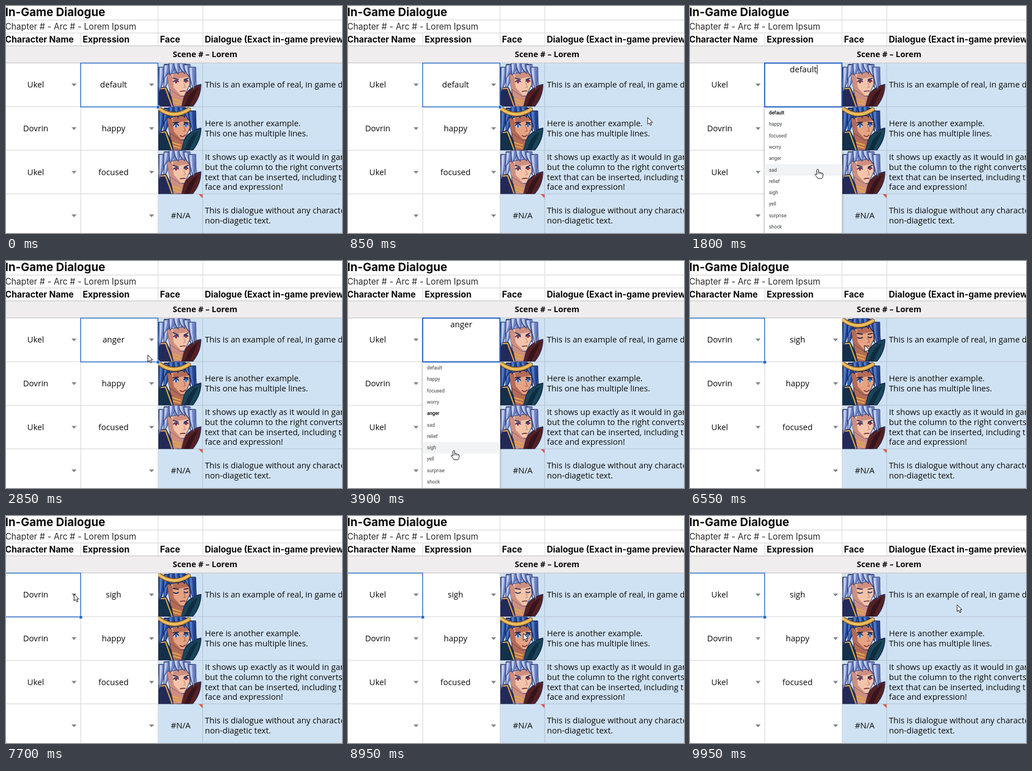
An HTML page for the animation above (10 s loop, 600x404 px).

```html
<!DOCTYPE html>
<html lang="en">
<head>
<meta charset="utf-8">
<title>In-Game Dialogue</title>
<style>
html, body { margin: 0; width: 100%; height: 100%; overflow: hidden; background: #fff; }
svg { display: block; }
text { font: 500 14.6px "Open Sans", "Noto Sans", sans-serif; fill: #0a0a0a; white-space: pre; }
.mid { text-anchor: middle; }
.title { font: 700 20.4px Inter, sans-serif; }
.chapter { font: 15.2px Inter, sans-serif; fill: #2b2b2b; }
.head { font: 700 15.4px Inter, sans-serif; }
.scene { font-weight: 700; font-size: 14.4px; }
.item { font: 8.7px Roboto, sans-serif; fill: #3c4043; }
.chosen { font-weight: 500; fill: #000; }
.menu { filter: drop-shadow(0 1px 2px #0006); }
</style>
</head>
<body>
<svg id="stage" width="600" height="404" viewBox="0 0 600 404">
  <g id="sheet"></g><g id="cells"></g><g id="pointer"></g>
</svg>
<script>
const LOOP = 10000, ITEM_H = 20.3, MENU_Y = 180, ARROW_Y = 140;
const HERO = 'Ukel', PRINCE = 'Dovrin';
const NAMES = [PRINCE, HERO, 'Hestrom', 'Velomi', 'Jorwy', 'Tolvane', 'Brenwa'];
const MOODS = ['default', 'happy', 'focused', 'worry', 'anger', 'sad', 'relief', 'sigh', 'yell', 'surprise', 'shock'];
const COLUMNS = {
  name: { x: -6, w: 139.3, mid: 53, arrow: 121.5, textX: 2, items: NAMES, bottom: 349 },
  mood: { x: 133.3, w: 138, mid: 192, arrow: 260, textX: 141, items: MOODS, bottom: 420 }
};
const rowTop = i => 101.6 + 77.6 * i;
const baseline = i => rowTop(i) + 43.8;

// Each step ends at its time: open a column's menu, pick an item, or just go to a point.
const STEPS = [
  { at: 1300, open: 'mood' }, { at: 1800, x: 228, y: 290 }, { at: 2300, pick: 'anger' },
  { at: 3100, open: 'mood' }, { at: 3800, x: 189, y: 338 }, { at: 4250, pick: 'sigh' },
  { at: 5200, open: 'name' }, { at: 5650, x: 114, y: 192 }, { at: 5800, pick: PRINCE },
  { at: 6600, x: 312, y: 150 }, { at: 7800, open: 'name' }, { at: 8300, pick: HERO },
  { at: 8950, x: 313, y: 209 }, { at: 9950, x: 477, y: 158 }
];

// The sheet's state and the pointer's place after every step.
const states = [{ at: 0, name: HERO, mood: 'default', column: 'mood', open: false, x: 612, y: 215 }];
for (const step of STEPS) {
  const last = states[states.length - 1], next = { ...last, ...step };
  if (step.open) Object.assign(next, { column: step.open, open: true, x: COLUMNS[step.open].arrow, y: ARROW_Y - 1 });
  if (step.pick) {
    const row = COLUMNS[last.column].items.indexOf(step.pick);
    Object.assign(next, { [last.column]: step.pick, open: false, y: MENU_Y + (row + .5) * ITEM_H });
  }
  states.push(next);
}

const $ = id => document.getElementById(id);
const text = (s, x, y, cls = '') => `<text x="${x}" y="${y}" class="${cls}">${s}</text>`;
const rect = (x, y, w, h, fill, more = '') =>
  `<rect x="${x}" y="${y}" width="${w}" height="${h}" fill="${fill}" ${more}/>`;
const path = (d, fill, stroke = 'none', w = 1) =>
  `<path d="${d}" fill="${fill}" stroke="${stroke}" stroke-width="${w}" stroke-linejoin="round"/>`;
const line = (d, color, w = 1) => path(d, 'none', color, w);
const repeat = (n, draw) => Array.from({ length: n }, (_, i) => draw(i)).join('');
const arrow = (x, y) => path(`M${x - 4.5} ${y - 2}h9l-4.5 5z`, '#80868b');

const ruler = document.createElement('canvas').getContext('2d');
ruler.font = '500 14.6px "Open Sans", "Noto Sans", sans-serif';

const LOOKS = {
  [HERO]: { ink: '#2b2f5e', hair: '#b9cbef', shade: '#6f83c6', skin: '#f3c4aa', shadow: '#cf8f80',
    iris: '#a8323f', coat: '#232a58', collar: '#57201f', lining: '#34151f' },
  [PRINCE]: { ink: '#14204c', hair: '#4a78c8', shade: '#274690', skin: '#e5a383', shadow: '#b56b56',
    iris: '#3a74c4', coat: '#15304a', collar: '#174758', lining: '#102c40', crown: true }
};
const GOLD = '#e0a848';

// A tapering strand of hair, its right half in shade.
function lock(x, w, tipX, tipY, look) {
  const top = (x - 34) ** 2 / 90 - 1, midY = (top + tipY) / 2;
  const left = `M${x - w} ${top}Q${x - w} ${midY} ${tipX} ${tipY}`, right = `Q${x + w} ${midY} ${x + w} ${top}`;
  return path(left + right + 'Z', look.hair, look.ink, 1.2) +
    path(`M${x} ${top}Q${x} ${midY} ${tipX} ${tipY}${right}Z`, look.shade);
}

function eye(x, y, w, mood, look) {
  if (mood === 'sigh') return line(`M${x - w} ${y}q${w} 4 ${w * 2} 0`, look.ink, 1.7);
  const h = mood === 'happy' ? 4.5 : 3.4;
  return path(`M${x - w} ${y}q${w} ${-h * 2} ${w * 2} 0q${-w} ${h * 1.6} ${-w * 2} 0`, '#fff') +
    `<ellipse cx="${x}" cy="${y - .4}" rx="2.4" ry="${h - .6}" fill="${look.iris}"/>` +
    line(`M${x - w} ${y}q${w} ${-h * 2} ${w * 2} 0`, look.ink, 1.8);
}

function portrait(name, mood, y) {
  const look = LOOKS[name], { ink } = look;
  const tilt = { anger: 5, focused: 4, default: 3, sigh: 2 }[mood] || -1;
  const smile = mood === 'happy' ? 5 : -1.5;
  const strands = (n, reach, drop) => repeat(n, i => {
    const k = i / (n - 1) * 2 - 1, x = 34 + 27 * k;
    return lock(x, 40 / n, x + reach * k + 3 * Math.sin(i * 5), drop(k) + 3 * Math.cos(i * 7), look);
  });
  const crown = `M-1 1Q27 24 57 3`;
  return `<svg x="272" y="${y}" width="77" height="77" viewBox="0 0 78 78">` +
    strands(6, 9, k => 44 + 8 * k * k) +
    path('M42 70Q50 44 77 38Q77 60 62 78H34Z', look.collar, ink, 1.5) +
    path('M50 72Q56 52 72 44L56 78H46Z', look.lining) +
    path('M20 42L48 54 42 78H24Z', look.shadow, ink) +
    line('M25 64l16 5M26 70l14 4', GOLD, 2.5) +
    path('M0 44L14 43 23 60 27 78H0Z', look.coat, ink, 1.5) +
    line('M2 46L13 45 25 78', GOLD, 2.2) +
    path('M16 20L56 14 57 38 47 59 39 59 20 46Z', look.skin, ink) +
    path('M16 20L25 22 28 44 42 59H39L20 46Z', look.shadow) +
    path('M26 20L56 14V24L28 29Z', look.shadow) +
    eye(32, 34, 5, mood, look) + eye(50, 33, 4, mood, look) +
    line(`M26 ${28 - tilt / 2}l11 ${tilt}M46 ${28 + tilt / 2}l9 ${-tilt}`, ink, 1.8) +
    line('M46 35l3 8-4 1', look.shadow, 1.4) +
    line(`M39 51q5 ${smile} 10-1`, '#6c2c34', 1.6) +
    strands(7, 6, k => 21 + 28 * k ** 4) +
    (look.crown ? line(crown, '#5c3a1c', 8) + line(crown, GOLD, 6) + line(crown, '#f6d27e', 1.5) : '') +
    '</svg>';
}

function drawSheet() {
  const dialogue = [
    ['This is an example of real, in game dialogue.'],
    ['Here is another example.', 'This one has multiple lines.'],
    ['It shows up exactly as it would in game,', 'but the column to the right converts it to',
      'text that can be inserted, including the', 'face and expression!'],
    ['This is dialogue without any character,', 'non-diagetic text.']
  ];
  const others = [[PRINCE, 'happy'], [HERO, 'focused']];
  $('sheet').innerHTML =
    rect(0, 0, 600, 404, '#fff') + rect(271, 101, 329, 303, '#cfe2f3') + rect(0, 71, 600, 30, '#efedee') +
    line('M0 25H600M0 48H600M271.5 0V70M351.5 0V70M133.5 48V70', '#dedede', 1.3) +
    line('M0 70.8H600M0 101.3H600', '#c8c8ca', 1.3) +
    line('M133.5 101V404M271.5 101V404', '#d8dadd', 1.3) + line('M351.3 101V404', '#b9c7d5', 1.3) +
    repeat(3, i => line(`M0 ${rowTop(i + 1)}H271`, '#d8dadd', 1.3) + line(`M271 ${rowTop(i + 1)}H600`, '#b9c7d5', 1.3)) +
    path('M344 335h7v7z', '#dc5a48') +
    text('In-Game Dialogue', -1.5, 17.7, 'title') +
    text('Chapter # - Arc # - Lorem Ipsum', -1.5, 42, 'chapter') +
    text('Character Name', -1.5, 64.8, 'head') + text('Expression', 137, 64.8, 'head') +
    text('Face', 275, 64.8, 'head') + text('Dialogue (Exact in-game preview)', 355, 64.8, 'head') +
    text('Scene # – Lorem', 355.5, 91, 'scene mid') + text('#N/A', 312, baseline(3), 'mid') +
    dialogue.map((rows, row) => rows.map((s, i) =>
      text(s, 355.3, baseline(row) + (i - (rows.length - 1) / 2) * 17.8)).join('')).join('') +
    others.map(([name, mood], i) => portrait(name, mood, rowTop(i + 1) + .6) +
      text(name, 53, baseline(i + 1), 'mid') + text(mood, 192, baseline(i + 1), 'mid')).join('') +
    repeat(3, i => arrow(121.5, rowTop(i + 1) + 38.6) + arrow(260, rowTop(i + 1) + 38.6));
}

function drawMenu(col, value, hover) {
  const { x, w, textX, items, bottom } = col;
  const rows = items.map((s, i) =>
    (i === hover ? rect(x, MENU_Y + i * ITEM_H, w, ITEM_H, '#f1f3f4') : '') +
    text(s, textX, MENU_Y + 13 + i * ITEM_H, s === value ? 'item chosen' : 'item')).join('');
  const footer = col === COLUMNS.name
    ? line('M0 324.5H133', '#dadce0') +
      path('M114 342l.6-2.8 6.2-6.2 2.2 2.2-6.2 6.2z', '#fff', '#444', 1.2)
    : '';
  return `<g class="menu">${rect(x, MENU_Y, w, bottom - MENU_Y, '#fff')}</g>` + rows + footer;
}

function drawCells(state, hover, caret) {
  const { column, open } = state, col = COLUMNS[column], value = state[column];
  let out = portrait(state.name, state.mood, 102);
  for (const key in COLUMNS) {
    if (open && key === column) continue;
    out += text(state[key], COLUMNS[key].mid, baseline(0), 'mid') + arrow(COLUMNS[key].arrow, ARROW_Y);
  }
  if (open) {
    const mid = col.mid + 10.3, end = mid + ruler.measureText(value).width / 2 + .8;
    out += drawMenu(col, value, hover) + text(value, mid, 118.3, 'mid') +
      (caret ? line(`M${end} 104.5V121.5`, '#000') : '');
  }
  out += rect(col.x, 101.6, col.w, 78, 'none', `stroke="${open ? '#1c5fc4' : '#3674ca'}" stroke-width="${open ? 2 : 1.6}"`);
  if (!open) out += `<circle cx="${col.x + col.w + .2}" cy="180" r="3.3" fill="#2c6bc9" stroke="#fff" stroke-width=".8"/>`;
  return out;
}

// Travel takes up to half a second and settles shortly before the step's time.
function pointerAt(t, from, to) {
  if (!to) return from;
  const end = to.at - 100, start = Math.max(from.at, end - 500);
  const k = Math.min(1, Math.max(0, (t - start) / (end - start))), ease = k * k * (3 - 2 * k);
  return { x: from.x + (to.x - from.x) * ease, y: from.y + (to.y - from.y) * ease };
}

const ARROW = path('M0 0V12.2L2.9 9.6 4.9 14.1 7 13.2 5 8.8H8.8Z', '#fff', '#111');
const HAND = path('M-1.5 1.5Q0-1 1.5 1.5V6.5Q3 5 4.2 6.8Q6 5.5 7 7.5Q9.2 6.8 9.5 9V12Q9 15 7.5 17H.5Q-1.5 14-5 10.2Q-4.5 7.8-1.5 10.2Z', '#fff', '#111') +
  line('M1.5 6.5V9M4.2 7V9.5M7 7.5V10', '#111', .8);

let shown = '';
function frame() {
  const t = performance.now() % LOOP;
  const index = states.findLastIndex(s => s.at <= t), state = states[index];
  const { x, y } = pointerAt(t, state, states[index + 1]);
  const overMenu = state.open && y > MENU_Y;
  const hover = overMenu && y > MENU_Y + 4 ? Math.floor((y - MENU_Y) / ITEM_H) : -1;
  const opened = states.findLast(s => s.at <= t && s.y === ARROW_Y - 1);
  const caret = state.open && (t - opened.at) % 1060 < 530;
  const key = [index, hover, caret].join();
  if (key !== shown) {
    $('cells').innerHTML = drawCells(state, hover, caret);
    shown = key;
  }
  $('pointer').innerHTML = `<g transform="translate(${x.toFixed(1)} ${y.toFixed(1)})">${overMenu ? HAND : ARROW}</g>`;
  requestAnimationFrame(frame);
}
drawSheet();
frame();
</script>
</body>
</html>
```
